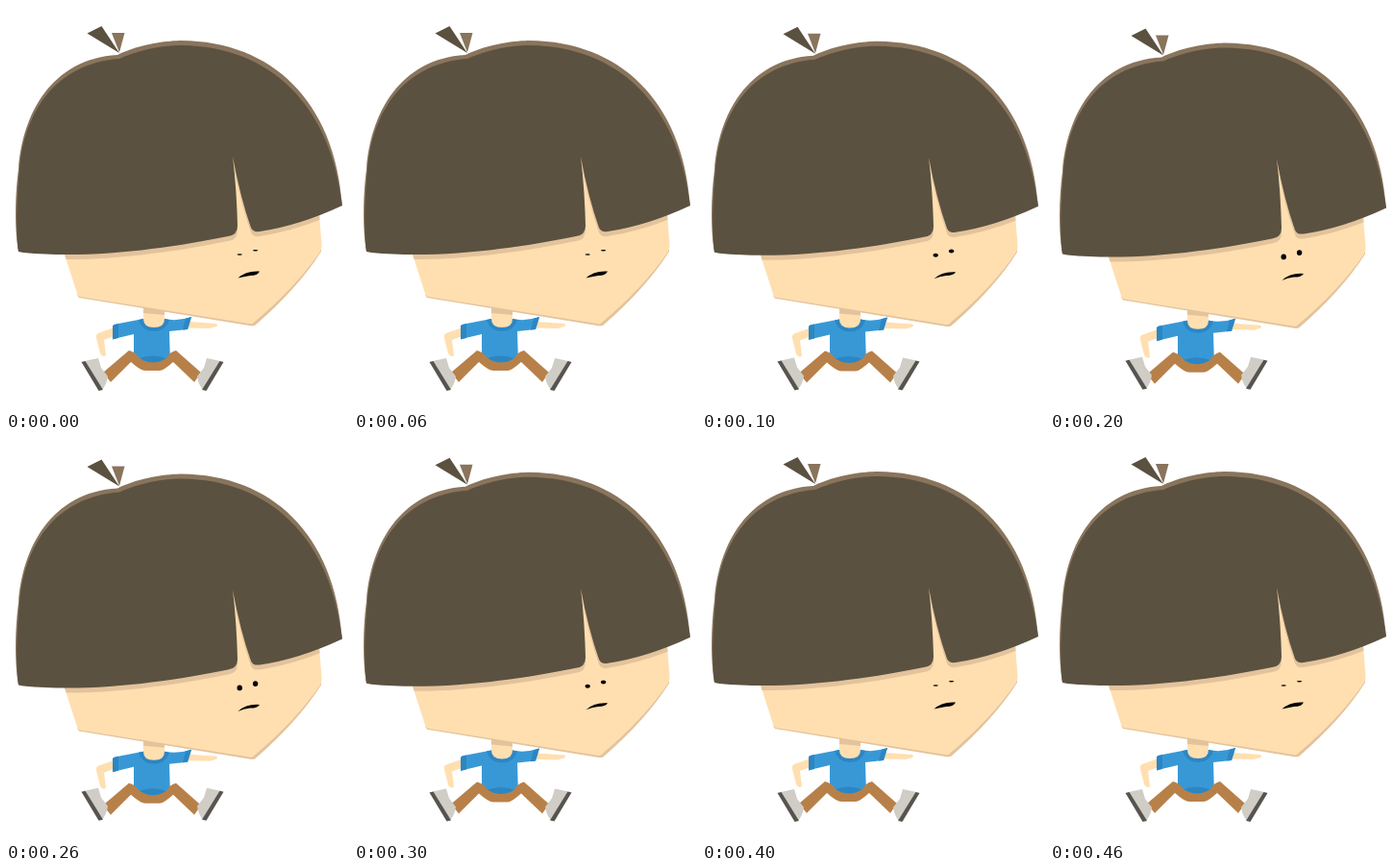
An HTML page for the animation above (0.5 s loop, 356x420 px).

```html
<!DOCTYPE html>
<html lang="en">
<head>
<meta charset="utf-8">
<title>Blinking boy</title>
<style>
html, body { margin: 0; width: 100%; height: 100%; overflow: hidden; background: #fff; }
svg { display: block; }
.skin { fill: #ffdfb0; }
.shade { fill: #e3c39c; }
.hair { fill: #5b5140; }
.rim { fill: #89745c; }
.shirt { fill: #3898d5; }
.fold { fill: #2c86c3; }
.trousers { fill: #b88049; }
</style>
</head>
<body>
<svg width="356" height="420" viewBox="0 0 356 420">
  <defs>
    <clipPath id="faceClip">
      <path id="face" d="M60 256L74.500 301Q75 302.500 77 303L256 331.500Q302 293 327 256Q329 252 328.500 248L326 216L236 150Z"/>
    </clipPath>
    <path id="hair" d="M13 256C10 235 11 200 14 170C19 112 50 60 118 55C145 43 170 41 183 41C274 42 338 102 350 208Q305 229 264 235Q257 236 255 231Q244 200 236 157Q240 190 241 229Q241 239 231 240C172 252 90 264 18 257Z"/>
    <g id="shoe">
      <path fill="#cfcdc5" d="M82 370L96 367L99 377L106 386Q105 394 100 400Z"/>
      <path fill="#57534f" d="M78.500 371L82.500 370L101 400L96.500 401Z"/>
    </g>
  </defs>

  <g id="body">
    <path class="skin" d="M113 335L96 341Q93 343 94 346L98 362Q101 367 104 364L102 348L113 344ZM190 329L219 331Q221 332.500 219 334L212 336L190 335.500Z"/>
    <path class="shirt" d="M112 332L143 326H165Q178 329 193 324L189 337L170 339L171 372H133V342L112 347Z"/>
    <path class="fold" d="M111 333L117 331V346L111 347.500ZM187 325.800L193 324L189 337L184 337.600ZM138 327Q142 339 154 339Q166 339 170 327L165 326L153 335L143 326Z"/>
    <path class="skin" d="M143 310H165V326Q165 335 154 335Q143 335 143 326Z"/>
    <path class="shade" d="M143 310H165V322L143 320Z"/>
    <path class="fold" d="M136 368Q153 361 169 368V374H136Z"/>
    <path class="trousers" d="M128 359L101 382L109 392L130 371Q140 380 145 380H160Q164 380 174 371L196 392L203 382L177 359Q171 360 167 367Q153 376 139 367Q134 360 128 359Z"/>
  </g>
  <g id="shoes">
    <use href="#shoe"/>
    <use href="#shoe" transform="translate(305) scale(-1 1)"/>
  </g>

  <g id="head">
    <path class="shade" d="M74 301L76 304L256 333.500L259 333Q304 294 328 256V248Z"/>
    <use href="#face" class="skin"/>
    <g clip-path="url(#faceClip)"><use href="#hair" class="shade" y="5"/></g>
    <path class="rim" d="M13 256C9 235 9 200 13 170C17 113 47 55 116 51C140 39 170 36 183 36C276 37 342 98 350 208L320 190L120 80L30 190Z"/>
    <use href="#hair" class="hair"/>
    <path class="hair" d="M84.500 28.500L99.500 21L118 49Z"/>
    <path class="rim" d="M110 28H123.500L118 48.500Z"/>
    <ellipse class="eye" cx="243.200" cy="259" rx="2.700"/>
    <ellipse class="eye" cx="259.600" cy="254.700" rx="2.700"/>
    <path id="mouth"/>
  </g>
</svg>
<script>
const find = id => document.getElementById(id);
const eyes = document.querySelectorAll(".eye");
const drop = [0, 0.8, 2.4];
const eyeHeight = [0.8, 2, 2.9];
const lipWeight = [5.5, 4.8, 4.6];

const shift = (id, y) => find(id).setAttribute("transform", `translate(0 ${y})`);

// The head sinks while the eyes open, then both return.
function pose(level) {
  shift("head", drop[level]);
  shift("body", drop[level] * 0.7);
  shift("shoes", -level * 0.6);
  eyes.forEach(eye => eye.setAttribute("ry", eyeHeight[level]));
  const lip = 277 + lipWeight[level];
  find("mouth").setAttribute("d",
    `M241.500 283.500Q250 275.500 264 276.500Q262 ${lip - 1.500} 254 ${lip - 1.500}Q247 ${lip - 0.500} 241.500 283.500Z`);
}

function tick() {
  const step = Math.floor(performance.now() % 500 / 100);
  pose(2 - Math.abs(step - 2));
  requestAnimationFrame(tick);
}
tick();
</script>
</body>
</html>
```
